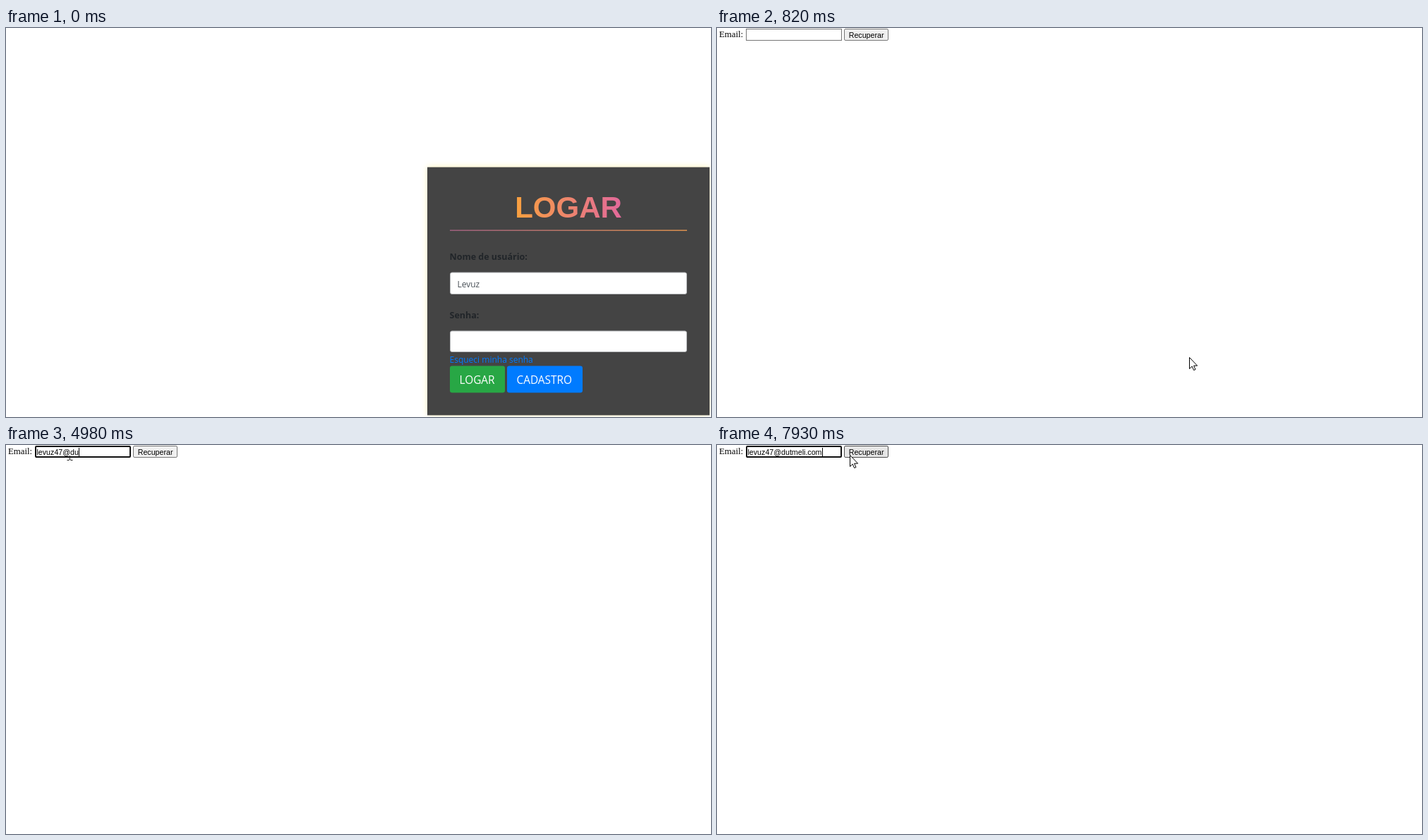
Write an HTML page that moves like this. It is 999 px wide and 552 px high and loops after 8 s.

```html
<!DOCTYPE html>
<html lang="pt-BR">
<head>
<meta charset="utf-8">
<title>Recuperar senha</title>
<style>
  html, body { margin: 0; width: 100%; height: 100%; overflow: hidden; background: #fff; }
  svg { display: block; width: 100vw; height: 100vh; }
  text { white-space: pre; }
  #login { font: 12px "Open Sans", "Noto Sans", sans-serif; }
  .title { font: bold 42px "Liberation Sans", Arial, sans-serif; }
  .label { font-size: 12.5px; font-weight: 700; fill: #212529; }
  .field { fill: #fff; stroke: #b4b6b9; }
  .caption { font-size: 15.4px; fill: #fff; }
  #forgot { fill: #007bff; }
  #forgot.hover { fill: #0056b3; text-decoration: underline; }
  #enter { fill: #28a745; }
  #enter.hover { fill: #218838; }
  #join { fill: #007bff; }
  #join.hover { fill: #0069d9; }
  #recover { font: 10.667px "Liberation Sans", Arial, sans-serif; }
  .email { font: 12.8px "Liberation Serif", "Times New Roman", serif; }
  #send { fill: #efefef; stroke: #767676; }
  #send.hover { fill: #e5e5e5; stroke: #4f4f4f; }
</style>
</head>
<body>
<svg viewBox="0 0 999 552" preserveAspectRatio="none">
  <defs>
    <linearGradient id="warm" gradientUnits="userSpaceOnUse" x1="722" y1="0" x2="873" y2="0">
      <stop stop-color="#f9a13f"/><stop offset="1" stop-color="#e2699b"/>
    </linearGradient>
    <linearGradient id="rule">
      <stop stop-color="#9a5f7c"/><stop offset="1" stop-color="#d38c4e"/>
    </linearGradient>
    <filter id="blur" x="-10%" y="-10%" width="120%" height="120%">
      <feGaussianBlur stdDeviation="5"/>
    </filter>
    <clipPath id="lower"><rect x="80" y="15" width="20" height="20"/></clipPath>
  </defs>

  <g id="login">
    <rect x="597" y="197" width="400" height="352" fill="#fff3a6" opacity=".75" filter="url(#blur)"/>
    <rect x="597" y="197.5" width="400" height="352" fill="#444"/>
    <text class="title" x="797" y="269" text-anchor="middle" fill="url(#warm)">LOGAR</text>
    <rect x="629" y="286.4" width="336" height="1.6" fill="url(#rule)"/>
    <text class="label" x="628.5" y="329">Nome de usuário:</text>
    <rect class="field" x="629.5" y="347" width="335" height="30.5" rx="2.5"/>
    <text x="639.5" y="368" fill="#495057">Levuz</text>
    <text class="label" x="628.5" y="412">Senha:</text>
    <rect class="field" x="629.5" y="430" width="335" height="29.5" rx="2.5"/>
    <text id="forgot" x="628.5" y="475">Esqueci minha senha</text>
    <rect id="enter" x="629" y="479.5" width="78" height="38" rx="3.2"/>
    <text class="caption" x="642.5" y="505">LOGAR</text>
    <rect id="join" x="710" y="479.5" width="107" height="38" rx="3.2"/>
    <text class="caption" x="723.5" y="505">CADASTRO</text>
  </g>

  <g id="recover">
    <text class="email" x="3" y="13">Email:</text>
    <rect id="idle" x="41.5" y="1.5" width="135" height="16" fill="#fff" stroke="#767676"/>
    <rect id="focus" x="42" y="2" width="134" height="15" rx="1" fill="#fff" stroke="#101010" stroke-width="2"/>
    <text id="typed" x="43.5" y="14"></text>
    <rect id="caret" y="4" width="1" height="12"/>
    <rect id="send" x="180.5" y="1.5" width="62" height="16" rx="1.6"/>
    <text x="186.7" y="14">Recuperar</text>
  </g>

  <g id="mouse">
    <path id="arrow" d="M.5 .5V16.6L4.2 13.1 6.6 18.6 9 17.6 6.6 12.2H11.6Z" fill="#fff" stroke="#000"/>
    <g id="beamBox">
      <path id="beam" d="M-3.5 -7.5H-1L.5 -6.5 2 -7.5H4.5M.5 -6.5V6.5M-3.5 7.5H-1L.5 6.5 2 7.5H4.5" fill="none" stroke="#222"/>
    </g>
  </g>
</svg>
<script>
const LOOP = 8000, OPEN = 820, FOCUS = 1660, OVERLAP = 4250, LEAVE = 7510, BLINK = 530;
const $ = id => document.getElementById(id);
const show = (id, on) => $(id).style.display = on ? "" : "none";

const address = "levuz47@dutmeli.com";
const keys = [2920, 3180, 3270, 3360, 3450, 3780, 3850, 4250, 4780, 4900, 5020,
  5130, 5250, 5370, 5640, 6040, 6500, 6600, 6700];

const smooth = p => p * p * (3 - 2 * p);
const mix = (a, b, p) => a + (b - a) * p;

// Mouse strokes: start, step length, last step, easing, points [progress, x, y]
const strokes = [
  { at: 70, step: 75, last: 10, ease: p => p,
    path: [[0, 800, 550], [.4, 722, 515], [.9, 672, 473], [1, 669, 467]] },
  { at: 890, step: 77, last: 10, ease: smooth,
    path: [[0, 669, 467], [.5, 360, 215], [1, 86, 10]] },
  { at: 1730, step: 70, last: 0, ease: p => p, path: [[0, 90, 14], [1, 90, 14]] },
  { at: LEAVE, step: 70, last: 6, ease: smooth,
    path: [[0, 90, 14], [.45, 130, 20], [1, 188, 14]] }
];

function mouseAt(t) {
  const s = strokes.filter(s => t >= s.at).pop();
  if (!s) return null;
  const k = Math.min(s.last, Math.floor((t - s.at) / s.step + 1e-6));
  const first = s === strokes[0] ? 0 : 1;
  const p = s.last ? s.ease((k + first) / (s.last + first)) : 1;
  let i = 1;
  while (i < s.path.length - 1 && p > s.path[i][0]) i++;
  const [a, b] = [s.path[i - 1], s.path[i]];
  const q = (p - a[0]) / (b[0] - a[0]);
  return [Math.round(mix(a[1], b[1], q)), Math.round(mix(a[2], b[2], q))];
}

function inside(m, x1, y1, x2, y2) {
  return !!m && m[0] >= x1 && m[0] < x2 && m[1] >= y1 && m[1] < y2;
}
const hover = (id, on) => $(id).classList.toggle("hover", on);

function draw(t) {
  const m = mouseAt(t), onForm = t < OPEN, focused = t >= FOCUS;
  show("login", onForm);
  show("recover", !onForm);
  hover("forgot", inside(m, 629, 462, 747, 479));
  hover("enter", inside(m, 629, 479, 707, 518));
  hover("join", inside(m, 710, 479, 817, 518));
  hover("send", !onForm && inside(m, 180, 1, 243, 18));

  show("idle", !focused);
  show("focus", focused);
  const count = keys.filter(k => t >= k).length;
  const typed = $("typed");
  typed.textContent = address.slice(0, count);
  const since = count ? keys[count - 1] : FOCUS;
  show("caret", focused && Math.floor((t - since) / BLINK) % 2 === 0);
  if (!onForm) $("caret").setAttribute("x", Math.round(43.5 + (count ? typed.getComputedTextLength() : 0)));

  const beam = !onForm && inside(m, 41, 1, 177, 18);
  show("mouse", m);
  show("arrow", !beam);
  show("beam", beam);
  if (!m) return;
  const place = `translate(${m[0]} ${m[1]})`;
  $("arrow").setAttribute("transform", place);
  $("beam").setAttribute("transform", place);
  // typed text covers the top of the resting beam
  const covered = t >= OVERLAP && t < LEAVE;
  $("beamBox").setAttribute("clip-path", covered ? "url(#lower)" : "none");
}

const start = performance.now();
function tick() {
  draw((performance.now() - start) % LOOP);
  requestAnimationFrame(tick);
}
tick();
</script>
</body>
</html>
```
